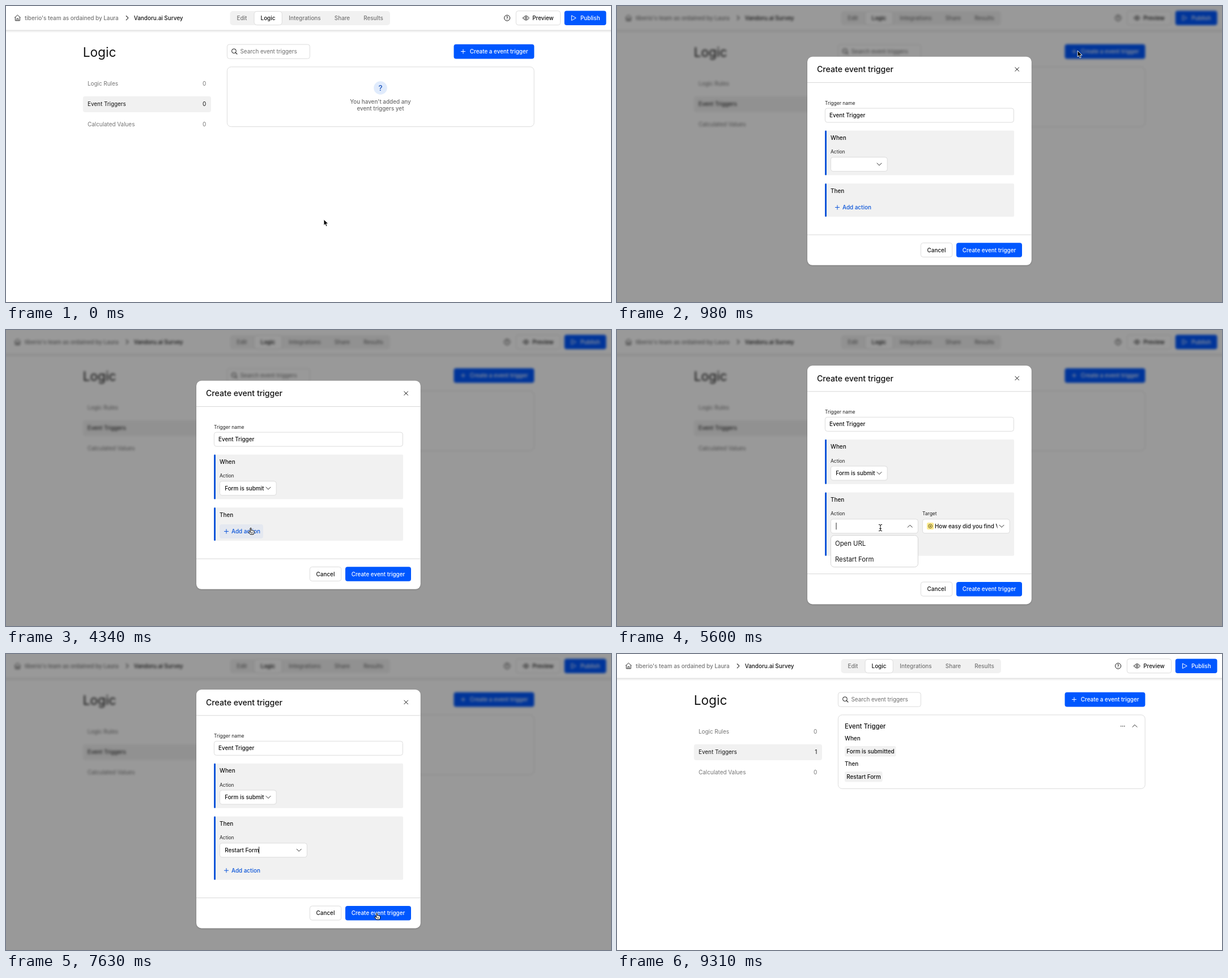
Write an HTML page that moves like this. It is 1068 px wide and 524 px high and loops after 9.73 s.

```html
<!DOCTYPE html>
<html lang="en">
<head>
<meta charset="utf-8">
<title>Event trigger</title>
<style>
html, body { margin: 0; width: 100%; height: 100%; overflow: hidden; background: #fff; }
svg { display: block; }
text { font-family: Inter, "Liberation Sans", sans-serif; }
path { stroke-linecap: round; stroke-linejoin: round; }
</style>
</head>
<body>
<svg id="stage" width="1068" height="524" viewBox="0 0 1068 524"></svg>
<script>
const LOOP = 9730, STEP = 70;
const SMALL = 8.47, BASE = 9.89, LARGE = 11.3;
const INK = '#111', GREY = '#747474', LINE = '#d8d8d8', FILL = '#f1f1f1', BLUE = '#0057ff', LINK = '#0b55d9';
const GROWTH = 53.4; // extra dialog height once an action row is added

// Drawing helpers
const text = (x, y, s, { size = BASE, weight = 500, fill = INK, anchor = 'start' } = {}) =>
  `<text x="${x}" y="${y}" font-size="${size}" font-weight="${weight}" fill="${fill}" text-anchor="${anchor}">${s}</text>`;
const plain = (x, y, s, size = BASE, fill = INK) => text(x, y, s, { size, fill, weight: 400 });
const mid = (x, y, s, fill = INK) => text(x, y, s, { fill, anchor: 'middle' });
const box = (x, y, w, h, r, fill, stroke = 'none') =>
  `<rect x="${x}" y="${y}" width="${w}" height="${h}" rx="${r}" fill="${fill}" stroke="${stroke}" stroke-width=".9"/>`;
const path = (d, stroke = INK, width = 1, fill = 'none') =>
  `<path d="${d}" stroke="${stroke}" stroke-width="${width}" fill="${fill}"/>`;
const circle = (x, y, r, fill, stroke = 'none') =>
  `<circle cx="${x}" cy="${y}" r="${r}" fill="${fill}" stroke="${stroke}"/>`;
const shift = (x, y, s) => `<g transform="translate(${x} ${y})">${s}</g>`;
const clip = (x, y, w, h, s) => `<svg x="${x}" y="${y}" width="${w}" height="${h}" viewBox="${x} ${y} ${w} ${h}">${s}</svg>`;
const plus = (x, y, color) => path(`M${x - 3.6} ${y}h7.2M${x} ${y - 3.6}v7.2`, color);
const chevron = (x, y, up) => path(`M${x - 4} ${y + (up ? 2 : -2)}l4 ${up ? -4 : 4}l4 ${up ? 4 : -4}`, INK, .9);

function header() {
  const tabs = [['Edit', 416.5], ['Logic', 462.5], ['Integrations', 527.5], ['Share', 593.5], ['Results', 648.5]];
  return `<g style="filter:drop-shadow(0 1px 2px #0003)">${box(-20, -20, 1108, 62.5, 0, '#fff')}</g>`
    + path('M15.6 20.3L20.4 16l4.8 4.3M16.4 19.7v6.2h8v-6.2M19 25.7v-3.4h2.8v3.4', '#333')
    + text(33, 24.6, "tiberio's team as ordained by Laura", { fill: GREY })
    + path('M212.2 17.5l3.6 3.7l-3.6 3.7', '#333', 1.1)
    + text(225.8, 24.6, 'Vandoru.ai Survey')
    + box(395.5, 9, 282.5, 25, 5, FILL) + box(438, 9.4, 49.3, 24.2, 5, '#fff', LINE)
    + tabs.map(([s, x]) => mid(x, 24.6, s, s == 'Logic' ? INK : GREY)).join('')
    + circle(884.6, 21.2, 5, 'none', INK) + text(884.6, 23.9, '?', { size: 7.5, anchor: 'middle' })
    + box(900.4, 8.7, 78.2, 25, 4, '#fff', LINE)
    + path('M912.6 21.2Q918 13.4 923.4 21.2Q918 29 912.6 21.2Z') + circle(918, 21.2, 1.7, 'none', INK)
    + text(929.2, 24.6, 'Preview')
    + box(985.7, 8.5, 73.8, 25.4, 4, BLUE)
    + path('M998.7 17l7.5 4.2l-7.5 4.2z', '#fff') + text(1014, 24.6, 'Publish', { fill: '#fff' });
}

function emptyCard() {
  return box(390.4, 107.8, 541.8, 105.8, 7, '#fff', LINE)
    + circle(661, 145, 11.8, '#e0ebfc')
    + text(661, 149.8, '?', { size: 13.5, fill: '#1d55bd', anchor: 'middle' })
    + mid(661, 173.4, "You haven't added any", '#6c6c6c')
    + mid(661, 185.4, 'event triggers yet', '#6c6c6c');
}

function triggerCard() {
  return box(390.4, 107.8, 541.8, 130.6, 7, '#fff', LINE)
    + text(402, 132, 'Event Trigger', { size: LARGE })
    + [889.8, 892.8, 895.8].map(x => circle(x, 127.8, .8, INK)).join('')
    + chevron(914, 127.3, true)
    + text(402, 153, 'When') + box(402, 163, 90.5, 18.6, 3, FILL) + text(405.3, 175.7, 'Form is submitted')
    + text(402, 198.2, 'Then') + box(402, 208, 66.5, 18.6, 3, FILL) + text(405.3, 220.7, 'Restart Form');
}

function page(done) {
  const rows = [['Logic Rules', 0], ['Event Triggers', done ? 1 : 0], ['Calculated Values', 0]];
  return box(-20, -20, 1108, 564, 0, '#fff') + header()
    + text(135.8, 90.2, 'Logic', { size: 22.6, weight: 400 })
    + box(135.8, 159.8, 226.2, 28.2, 4, FILL)
    + rows.map(([s, n], i) => {
      const y = 141.4 + 36 * i, fill = i == 1 ? INK : GREY;
      return plain(144, y, s, BASE, fill) + text(353.3, y, n, { fill, weight: 400, anchor: 'end' });
    }).join('')
    + box(390.4, 68, 146, 25.2, 4, '#fff', LINE)
    + circle(402.4, 79.7, 3.9, 'none', INK) + path('M405.3 82.6l2.6 2.6', INK, 1.1)
    + plain(413.5, 84, 'Search event triggers', BASE, '#6c6c6c')
    + box(790.5, 67.8, 141.9, 25.6, 4, BLUE) + plus(807, 80.5, '#fff')
    + text(818.8, 84, 'Create a event trigger', { fill: '#fff' })
    + (done ? triggerCard() : emptyCard());
}

const panel = (y, h, title) => box(367, y, 334, h, 2, FILL)
  + box(367, y, 3, h, 1.2, LINK) + text(377, y + 16.4, title);

const select = (x, y, w, label, value, open, caretX) => plain(x, y - 6, label, SMALL, '#222')
  + box(x + .4, y + .3, w - .8, 25, 4, '#fff', LINE)
  + clip(x, y, w - 22, 25, value)
  + chevron(x + w - 14.6, y + 12.8, open)
  + (caretX ? path(`M${caretX} ${y + 7}v11.4`, INK, .9) : '');

// Options are groups of lines; the row under the pointer is tinted.
function menu(x, y, w, options, pointerY) {
  let top = y, tint = '', labels = '';
  for (const lines of options) {
    const h = 14.2 + 13.8 * lines.length;
    if (pointerY >= top && pointerY < top + h) tint = box(x + .8, top + .4, w - 1.6, h, 5, '#e3edfc');
    lines.forEach((s, i) => labels += plain(x + 8, top + 18.2 + 13.8 * i, s, LARGE));
    top += h;
  }
  return box(x + .4, y, w - .8, top - y, 6, '#fff', '#d0d0d0') + tint + labels;
}

const blink = (t, start) => (t - start) % 1050 < 560;

function dialog(t, pointer) {
  const grown = t >= 4620, extra = grown ? GROWTH : 0, dy = -extra / 2;
  const pickWhen = t >= 2310 && t < 3640, pickThen = t >= 5530 && t < 6580, restart = t >= 6580;
  const y = pointer.y - dy, rowY = 361.2;
  let s = `<g style="filter:drop-shadow(0 1px 1px #0003)">${box(336, 89.8, 395.8, 369 + extra, 9, '#fff')}</g>`
    + text(353, 117.4, 'Create event trigger', { size: 14.12 })
    + path('M702.9 108.8l6.6 6.6m0-6.6l-6.6 6.6')
    + path('M336.5 135.5h394.8', LINE)
    + plain(367, 175.2, 'Trigger name', SMALL, '#222')
    + box(367.4, 181, 333, 25, 4, '#fff', LINE) + text(375, 197.2, 'Event Trigger')
    + panel(220.5, 79, 'When')
    + select(377, 267.4, 100.6, 'Action', t >= 3640 ? text(386.2, 283.6, 'Form is submitted') : '',
      pickWhen, pickWhen && blink(t, 2310) && 387)
    + panel(314.3, 58.7 + extra, 'Then');
  if (grown) {
    const caret = pickThen ? blink(t, 5530) && 387 : restart && blink(t, 6580) && 446.6;
    s += select(377, rowY, 154.8, 'Action', restart ? text(386.2, rowY + 16.2, 'Restart Form') : '', pickThen, caret);
    if (!restart) s += select(539, rowY, 154.6, 'Target',
      box(547, rowY + 6.6, 12.2, 12.2, 2.5, '#fcec94') + circle(553.1, rowY + 12.7, 3.4, 'none', '#6d5a10')
      + circle(553.1, rowY + 12.7, 1.3, '#6d5a10')
      + text(561, rowY + 16.2, 'How easy did you find Vandoru.ai?'));
  }
  if (t >= 4270 && t < 4620) s += box(377, 344, 77, 25, 4, '#e4e8f0');
  s += plus(389, 356.5 + extra, LINK) + text(398, 360.1 + extra, 'Add action', { fill: LINK });
  s += path(`M336.5 ${405 + extra}h394.8`, LINE)
    + box(536.4, 419.4 + extra, 55.4, 25, 4, '#fff', LINE) + mid(564, 435.5 + extra, 'Cancel')
    + box(599, 419.2 + extra, 116, 25.5, 4, BLUE) + mid(657, 435.5 + extra, 'Create event trigger', '#fff');
  if (pickWhen) s += menu(377, 296.6, 100.6, [['Form is', 'submitted'], ['Form is loaded'], ['Form page is', 'shown']], y);
  if (pickThen) s += menu(377, 390.3, 154.8, [['Open URL'], ['Restart Form']], y);
  return shift(0, dy, s);
}

// Pointer shapes, each with its hot spot at 0,0
const shapes = {
  arrow: path('M0 0v10.4l2.4-2.2l1.7 4l2-.9l-1.7-3.8h3.3z', '#fff', .9, '#000'),
  hand: path('M-.9.9Q0-.5 .9.9V4.8Q2 4 2.7 5Q3.9 4.4 4.5 5.5Q6.1 5.1 6.2 6.8Q6.3 9.6 4.9 11.8H-.8L-3.9 7.7Q-3.9 6.2-2.4 6.7L-.9 8.2z', '#000', 1, '#fff')
    + path('M1.2 7.6v2.4M3 7.6v2.4', '#000', .7),
  beam: [['#fff', 2.4], ['#000', 1]].map(([c, w]) =>
    path('M-2.6-5.6Q0-5.6 0-4Q0-5.6 2.6-5.6M0-4V4.2M-2.6 5.8Q0 5.8 0 4.2Q0 5.8 2.6 5.8M-1.4 1.6h2.8', c, w)).join('')
};

// Moves: start, end, target x, y, optional bend point
const moves = [
  [0, 630, 813, 79.5, 1090, 130],
  [1470, 2100, 450, 284, 600, 300],
  [3080, 3360, 427.5, 314.5],
  [3920, 4340, 432, 350],
  [5040, 5250, 465, 350],
  [5950, 6370, 455, 403],
  [7070, 7630, 654.6, 458.3],
  [8890, 9310, 565, 530]
];
const kinds = [[0, 'arrow'], [560, 'hand'], [910, 'arrow'], [1960, 'beam'], [3220, 'hand'],
  [5110, 'beam'], [6160, 'hand'], [7910, 'arrow']];

function pointerAt(t) {
  let x = 561, y = 378;
  for (const [from, to, tx, ty, bx = (x + tx) / 2, by = (y + ty) / 2] of moves) {
    if (t <= from) break;
    const p = Math.min(1, (t - from) / (to - from)), k = p * p * (3 - 2 * p), q = 1 - k;
    x = q * q * x + 2 * q * k * bx + k * k * tx;
    y = q * q * y + 2 * q * k * by + k * k * ty;
  }
  return { x, y, kind: kinds.findLast(([start]) => t >= start)[1] };
}

function scene(t) {
  const pointer = pointerAt(t);
  const shown = t < 7910 ? Math.max(0, Math.min(1, (t - 840) / 140)) : 0;
  const back = page(t >= 7910);
  return (shown ? `<g style="filter:blur(${2 * shown}px)">${back}</g>`
      + `<rect width="1068" height="524" opacity="${.4 * shown}"/><g opacity="${shown}">${dialog(t, pointer)}</g>` : back)
    + shift(pointer.x, pointer.y, shapes[pointer.kind]);
}

const stage = document.getElementById('stage');
const begin = performance.now();
let last = -1;
function tick() {
  const t = Math.floor((performance.now() - begin) % LOOP / STEP) * STEP;
  if (t != last) stage.innerHTML = scene(last = t);
  requestAnimationFrame(tick);
}
tick();
</script>
</body>
</html>
```
